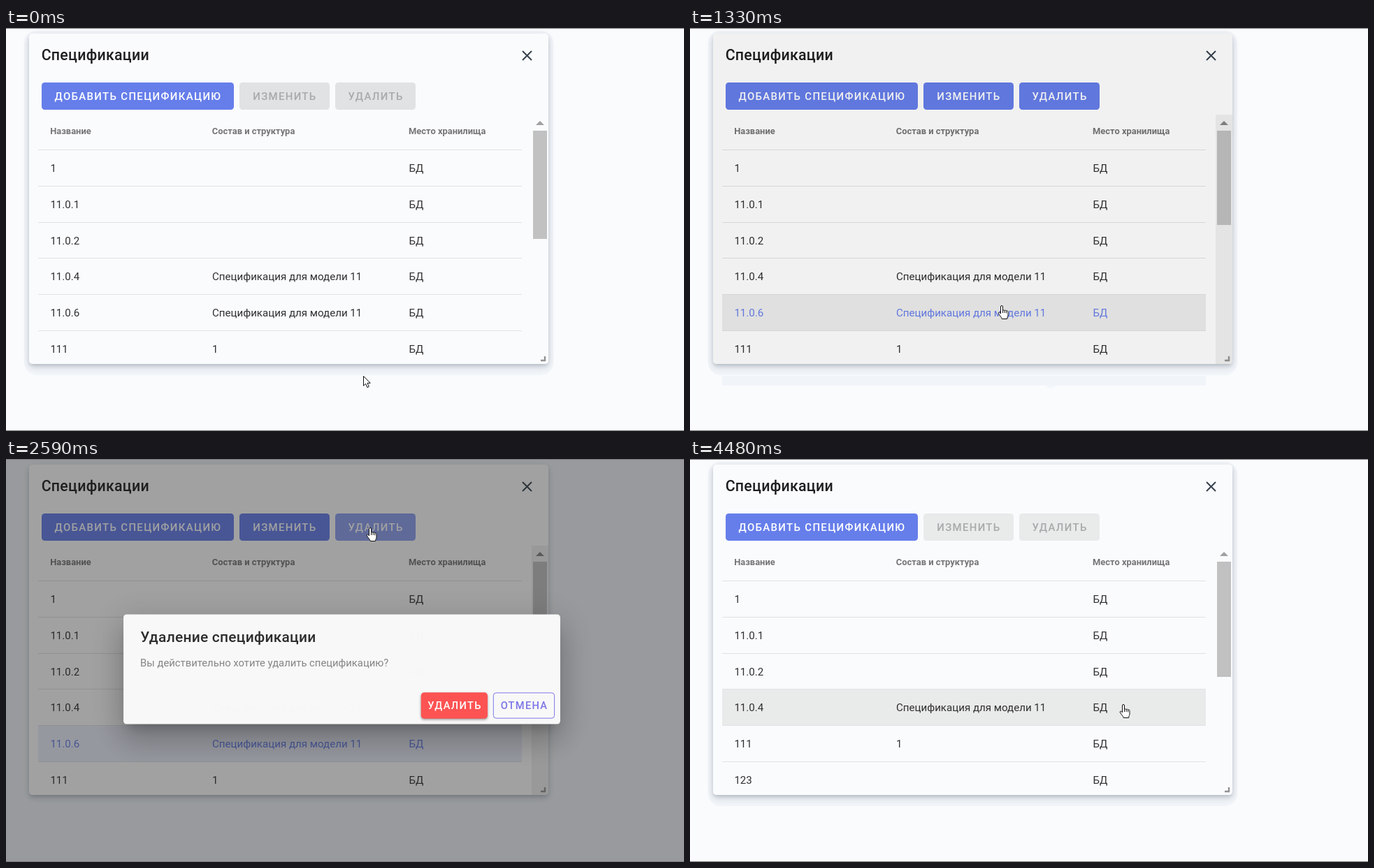
These frames come from a looping animation (970x577 px, 5800 ms). An HTML page:

```html
<!DOCTYPE html>
<html lang="ru">
<head>
<meta charset="utf-8">
<title>Спецификации</title>
<style>
  html, body { margin: 0; width: 100%; height: 100%; overflow: hidden; }
  body { font: 15.1px Roboto, sans-serif; color: #303030; }
  #stage { position: relative; width: 970px; height: 577px; overflow: hidden; }
  #stage div, #stage svg { position: absolute; box-sizing: border-box; white-space: nowrap; }
  .edge { left: 0; width: 970px; height: 1px; background: #77787a; }
  #halo { left: 26px; top: 4px; width: 757px; height: 493px; border-radius: 18px; background: #f1f4f8; }
  #trail { left: 46px; top: 498px; width: 692px; height: 14px; background: #f1f4f9; }
  #trail div { left: 464px; top: 14px; width: 12px; height: 3px; background: #f3f6fa; }
  #shade { left: 33px; top: 8px; width: 743px; height: 473px; border-radius: 5px;
    box-shadow: 0 3px 5px -1px rgba(40,55,75,.2), 0 5px 10px rgba(40,55,75,.11), 0 2px 14px rgba(40,55,75,.06); }
  #panel { left: 33px; top: 8px; width: 743px; height: 473px; border-radius: 5px; overflow: hidden; }
  /* Content keeps stage coordinates inside the clipped panel */
  #content { left: -33px; top: -8px; width: 970px; height: 577px; }
  .title { font-size: 21.3px; font-weight: 500; letter-spacing: .0125em; color: #1f1f1f; }
  .btn { display: flex; align-items: center; justify-content: center; height: 38px; border-radius: 4.5px;
    font-size: 14.95px; font-weight: 500; letter-spacing: .0893em; text-indent: .0893em; color: #fff; background: #667eea; }
  #content .btn { top: 78.4px; height: 38.8px; }
  .head { top: 138px; line-height: 20px; font-size: 12.92px; font-weight: 700; color: #757575; }
  .row { left: 46px; width: 692px; height: 53px; border-top: 1px solid #e1e2e4; line-height: 52px; }
  .row div { top: 0; }
  #track { left: 752px; top: 124px; width: 24px; height: 357px; background: #f1f1f1; }
  #thumb { left: 754px; top: 147px; width: 20px; background: #c1c1c1; }
  #veil { inset: 0; background: #000; }
  #overlay { inset: 0; background: #212121; }
  #dialog { left: 162px; top: 220.5px; width: 637px; height: 160px; border-radius: 4.5px; background: #fafafa;
    box-shadow: 0 12px 16px -7px rgba(0,0,0,.2), 0 26px 41px 3px rgba(0,0,0,.14), 0 10px 50px 9px rgba(0,0,0,.12); }
  #dialog .btn { top: 114px; }
</style>
</head>
<body>
<div id="stage">
  <div id="halo"></div>
  <div id="trail"><div></div></div>
  <div id="shade"></div>
  <div id="panel">
    <div id="content">
      <div class="title" style="left:50.7px;top:19px;line-height:40px">Спецификации</div>
      <svg style="left:738px;top:32px" width="15" height="15"><path d="M1 1 14 14M14 1 1 14" stroke="#37434d" stroke-width="2"/></svg>
      <div class="btn" style="left:51px;width:274.5px">ДОБАВИТЬ СПЕЦИФИКАЦИЮ</div>
      <div class="btn" id="edit" style="left:334px;width:128.5px">ИЗМЕНИТЬ</div>
      <div class="btn" id="remove" style="left:471px;width:115px">УДАЛИТЬ</div>
      <div class="head" style="left:63.2px">Название</div>
      <div class="head" style="left:294.8px">Состав и структура</div>
      <div class="head" style="left:576px">Место хранилища</div>
      <div id="rows"></div>
      <div id="track"></div>
      <div id="thumb"></div>
      <svg style="left:758px;top:133px" width="12" height="6"><path id="up" d="M0 6 6 0 12 6Z"/></svg>
      <svg style="left:765px;top:470px" width="8" height="8"><path d="M6 0V6H0" fill="none" stroke="#929292" stroke-width="2.4"/></svg>
    </div>
    <div id="veil"></div>
  </div>
  <div id="overlay"></div>
  <div id="dialog">
    <div class="title" style="left:24.7px;top:17.6px;line-height:30px;color:#2c2c2c">Удаление спецификации</div>
    <div style="left:24.5px;top:60.4px;line-height:22px;color:#858585">Вы действительно хотите удалить спецификацию?</div>
    <div class="btn" id="confirm" style="left:434px;width:97px">УДАЛИТЬ</div>
    <div class="btn" style="left:539px;width:90px;color:#7c75e8;background:none;border:1px solid">ОТМЕНА</div>
  </div>
  <div class="edge" style="top:0"></div>
  <div class="edge" style="top:576px"></div>
  <svg id="arrow" width="14" height="20" style="overflow:visible">
    <path d="M.5 .5V14.2L3.6 11.3 5.8 16.6 8.2 15.6 6 10.4H10.2Z" fill="#fff" stroke="#111"/>
  </svg>
  <svg id="hand" width="17" height="21" style="overflow:visible">
    <path d="M4.5 12V2a1.5 1.5 0 0 1 3 0V7.6a1.4 1.4 0 0 1 2.6.3 1.4 1.4 0 0 1 2.6.5 1.3 1.3 0 0 1 2.3 1V14c0 2-1.4 3-1.4 5.5H6.2C6 17 3 15 1.4 12 .5 10 2.8 9 4.5 12Z" fill="#fff" stroke="#111"/>
    <path d="M7.5 7.5V11M10.1 8V11M12.7 8.5V11.3" stroke="#111"/>
  </svg>
</div>
<script>
const LOOP = 5800;
const $ = id => document.getElementById(id);
const GRAY = '#ededed', PAGE = '#fafbfd', BLUE = '#667eea', PALE = '#ebeefb';
const MODEL = 'Спецификация для модели 11';
const specs = [['1', ''], ['11.0.1', ''], ['11.0.2', ''], ['11.0.4', MODEL], ['11.0.6', MODEL], ['111', '1'], ['123', '']];

const rows = Array.from({ length: 6 }, (_, i) => {
  const row = document.createElement('div');
  row.className = 'row';
  row.style.top = Math.round(174 + 51.75 * i) + 'px';
  const cells = [17.4, 249, 530.4].map(x => {
    const cell = document.createElement('div');
    cell.style.left = x + 'px';
    return row.appendChild(cell);
  });
  $('rows').append(row);
  return { row, cells };
});

// Each step overrides only what changes; cursor is [shape, x, y] of its hot spot.
const steps = [
  { t: 0, cursor: ['arrow', 511, 498], fills: {}, page: PAGE, panel: PAGE, thumb: 155, selected: false,
    deleted: false, off: '#e1e2e3', hot: BLUE, trail: 0, halo: 1, veil: 0, overlay: 0, scale: 1, alpha: 0,
    confirm: '#ff5252', lift: 0 },
  { t: 280, cursor: null },
  { t: 430, cursor: ['arrow', 478, 447], fills: { 5: GRAY }, trail: 1 },
  { t: 580, cursor: ['arrow', 455, 414], fills: { 4: GRAY, 5: '#fff' } },
  { t: 740, cursor: ['hand', 445, 397] },
  { t: 1040, cursor: ['arrow', 449, 397] },
  { t: 1180, cursor: ['hand', 446, 397], panel: '#fff', selected: true, thumb: 135, veil: .13 },
  { t: 1330, veil: .055 },
  { t: 1460, veil: 0 },
  { t: 1730, cursor: ['hand', 434, 229], fills: { 1: GRAY, 2: '#f5f5f5', 4: PALE } },
  { t: 1880, cursor: ['hand', 426, 165], fills: { 1: '#f5f5f5', 4: PALE } },
  { t: 2010, cursor: ['hand', 421, 126], fills: { 4: PALE } },
  { t: 2160, cursor: ['hand', 521, 98], hot: '#7187eb' },
  { t: 2460, hot: '#8d9ff0', trail: 0, halo: 0, page: '#eff3f7', overlay: .24, scale: .84, alpha: .6 },
  { t: 2590, overlay: .42, scale: .981, alpha: .985 },
  { t: 2730, cursor: ['hand', 545, 108], overlay: .46, scale: 1, alpha: 1 },
  { t: 2880, cursor: ['arrow', 625, 270], hot: BLUE },
  { t: 3010, cursor: ['hand', 678, 353] },
  { t: 3160, cursor: ['arrow', 617, 351], confirm: '#ff6060' },
  { t: 3310, cursor: ['hand', 620, 351] },
  { t: 3900, confirm: '#ff6666', lift: .5 },
  { t: 4030, confirm: '#ff6b6b', lift: 1 },
  { t: 4180, overlay: .255, scale: .9215, alpha: .86, lift: 0, deleted: true, selected: false, fills: {}, thumb: 165 },
  { t: 4330, page: PAGE, overlay: .04, scale: .78, alpha: .18 },
  { t: 4480, overlay: 0, alpha: 0, halo: 1, panel: PAGE, off: '#e9eaea', fills: { 3: '#e9eaea' } }
];
for (let i = 1; i < steps.length; i++) steps[i] = { ...steps[i - 1], ...steps[i] };

function paintButton(id, enabled, color, off) {
  $(id).style.background = enabled ? color : off;
  $(id).style.color = enabled ? '#fff' : '#a8a9aa';
}

function paint(s) {
  const list = specs.filter((_, i) => !(s.deleted && i === 4));
  rows.forEach(({ row, cells }, i) => {
    [...list[i], 'БД'].forEach((text, c) => { cells[c].textContent = text; });
    row.style.background = s.fills[i] || 'none';
    row.style.color = s.selected && i === 4 ? BLUE : '';
  });
  paintButton('edit', s.selected, BLUE, s.off);
  paintButton('remove', s.selected, s.hot, s.off);

  const dimmed = s.veil > 0 || s.overlay > 0;
  $('stage').style.background = s.page;
  $('panel').style.background = s.panel;
  $('track').style.opacity = dimmed ? 1 : 0;
  $('up').setAttribute('fill', dimmed ? '#858585' : '#a0a0a0');
  $('thumb').style.height = s.thumb + 'px';
  for (const id of ['trail', 'halo', 'veil', 'overlay']) $(id).style.opacity = s[id];

  $('dialog').style.opacity = s.alpha;
  $('dialog').style.transform = `scale(${s.scale})`;
  $('confirm').style.background = s.confirm;
  $('confirm').style.boxShadow =
    `0 ${2 + 3 * s.lift}px ${4 + 4 * s.lift}px rgba(0,0,0,.28), 0 1px ${3 + 7 * s.lift}px rgba(0,0,0,.16)`;

  for (const shape of ['arrow', 'hand']) {
    const style = $(shape).style, on = s.cursor && s.cursor[0] === shape;
    style.display = on ? 'block' : 'none';
    if (on) {
      style.left = s.cursor[1] - (shape === 'hand' ? 6 : 0) + 'px';
      style.top = s.cursor[2] + 'px';
    }
  }
}

let shown;
function tick() {
  const t = performance.now() % LOOP;
  const step = steps.findLast(s => s.t <= t);
  if (step !== shown) paint(shown = step);
  requestAnimationFrame(tick);
}
tick();
</script>
</body>
</html>
```
